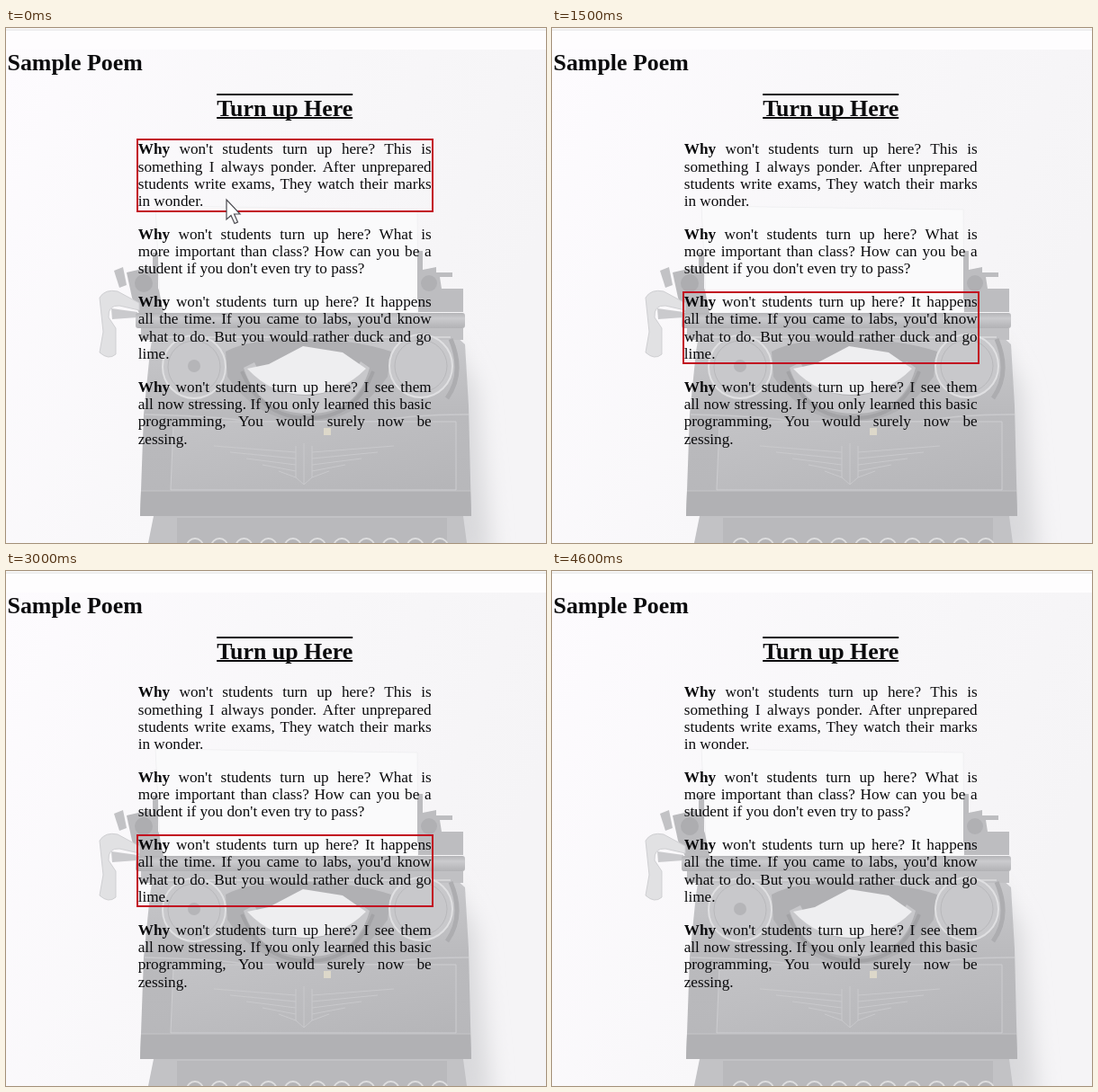
An HTML page for the animation above (4.7 s loop, 600 by 573 pixels).

```html
<!DOCTYPE html>
<html lang="en">
<head>
<meta charset="utf-8">
<title>Sample Poem</title>
<style>
html, body { margin: 0; width: 100%; height: 100%; overflow: hidden; background: #fff; }
#stage { position: relative; width: 600px; height: 573px; overflow: hidden;
  font-family: "Liberation Serif", "Times New Roman", serif; color: #0b0b0d; }
svg { position: absolute; left: 0; top: 0; }
h1, h2, p { position: absolute; margin: 0; }
h1, h2 { font-size: 25.9px; line-height: 30px; white-space: nowrap; }
h1 { left: 1.5px; top: 23.5px; }
h2 { left: 146.7px; width: 326px; top: 74.5px; text-align: center;
  text-decoration: underline overline 2px; text-decoration-skip-ink: none; }
p { left: 146.7px; width: 326px; font-size: 17.2px; line-height: 19.35px; }
.line { display: block; text-align: justify; text-align-last: justify; }
.line:last-child { text-align-last: left; }
.on { outline: 2px solid #c20a20; }
</style>
</head>
<body>
<div id="stage">
<svg width="600" height="573" viewBox="0 0 600 573">
  <defs>
    <linearGradient id="wall" x2="1" y2=".35">
      <stop offset="0" stop-color="#fdfbfe"/><stop offset=".55" stop-color="#f8f7f9"/><stop offset="1" stop-color="#f5f4f6"/>
    </linearGradient>
    <linearGradient id="shell" x2="0" y2="1">
      <stop offset="0" stop-color="#c9c9cc"/><stop offset=".45" stop-color="#bababd"/><stop offset="1" stop-color="#b7b7ba"/>
    </linearGradient>
    <linearGradient id="roller" x2="0" y2="1">
      <stop offset="0" stop-color="#b4b4b7"/><stop offset=".35" stop-color="#cbcbce"/><stop offset="1" stop-color="#b2b2b5"/>
    </linearGradient>
    <linearGradient id="panel" x2="1" y2="1">
      <stop offset="0" stop-color="#c3c3c6"/><stop offset="1" stop-color="#b5b5b8"/>
    </linearGradient>
    <filter id="soft" x="-50%" y="-20%" width="200%" height="140%"><feGaussianBlur stdDeviation="12"/></filter>
  </defs>
  <rect width="600" height="573" fill="#fefdfe"/>
  <rect width="600" height="1.5" fill="#f8f8f8"/>
  <rect y="1.5" width="600" height="1.5" fill="#ebebec"/>
  <rect y="24" width="600" height="549" fill="url(#wall)"/>
  <path d="M490 340L522 400L540 590H480Z" fill="#d9d9dc" filter="url(#soft)"/>

  <!-- carriage and paper -->
  <path d="M166 198L457 202L458 320H172Z" fill="#fafafb" stroke="#f0f0f2"/>
  <path d="M163 250h6v52h-6zM457 248h6v54h-6z" fill="#bcbcbf"/>
  <path d="M134 272L160 266L170 292L176 322H150L140 300Z" fill="#bbbbbe"/>
  <path d="M458 270L478 266V272H496V277H482L484 290H508V316H458Z" fill="#bdbdc0"/>
  <path d="M120 270l10-4 4 20-8 3z" fill="#c2c2c5"/>
  <circle cx="153" cy="284" r="10" fill="#adadb0"/>
  <circle cx="470" cy="284" r="9" fill="#b0b0b3"/>
  <path d="M104 300Q110 290 124 293L148 306V314L126 309Q113 308 114 322L122 334V363Q114 370 104 361L108 338Z" fill="#e1e1e3" stroke="#cfcfd2"/>
  <path d="M117 312L146 316V322L118 324Z" fill="#cacacd"/>

  <!-- body -->
  <path d="M164 336H492L510 352L514 420L517 543H149L153 430L160 360Z" fill="url(#shell)"/>
  <rect x="144" y="317" width="366" height="17" rx="3" fill="url(#roller)"/>
  <path d="M150 334H508V347H150Z" fill="#c0c0c3"/>
  <path d="M170 344H494" stroke="#d4d4d6" stroke-width="2"/>
  <path d="M244 360Q270 346 328 346T428 360L424 388Q390 438 335 438T246 388Z" fill="#b0b0b3"/>
  <path d="M264 378Q280 428 335 429T404 378L394 371Q374 409 333 409T276 372Z" fill="#c8c8cb"/>
  <path d="M268 379L292 374L330 354L374 361L400 379Q372 407 334 408T268 379Z" fill="#eeeef0"/>
  <path d="M262 382Q284 434 336 434T408 382" fill="none" stroke="#a3a3a6" stroke-width="4"/>
  <g fill="#c8c8cb" stroke="#e0e0e2" stroke-width="2">
    <circle cx="209" cy="377" r="35"/><circle cx="461" cy="376" r="35"/>
    <circle cx="209" cy="377" r="29" stroke="#b8b8bb" stroke-width="1"/>
    <circle cx="461" cy="376" r="29" stroke="#b8b8bb" stroke-width="1"/>
  </g>
  <circle cx="209" cy="376" r="7" fill="#b5b5b8"/>
  <path d="M494 346Q510 384 490 412" fill="none" stroke="#adadb0" stroke-width="5"/>
  <path d="M154 430Q240 432 270 438H410Q450 430 514 430" fill="none" stroke="#cacacd" stroke-width="1.5"/>
  <path d="M186 438H500V514H183Z" fill="url(#panel)" stroke="#cdcdd0"/>
  <rect x="353" y="445" width="8" height="8" fill="#ddd8ca"/>
  <g id="stripes" fill="none" stroke="#c9c9cc"></g>
  <path d="M150 515H516L517 543H149Z" fill="#b1b1b4"/>
  <path d="M150 515H516" stroke="#c5c5c8"/>
  <path d="M164 543H508L512 573H158Z" fill="#c2c2c5"/>
  <path d="M190 545H490V573H190Z" fill="#b9b9bc"/>
  <g id="keys" fill="#b4b4b7" stroke="#dededf" stroke-width="2"></g>
</svg>
<h1>Sample Poem</h1>
<h2>Turn up Here</h2>
<div id="poem"></div>
<svg width="600" height="573" viewBox="0 0 600 573">
  <path id="cursor" d="M0 0V22L5 17.5L9 26.5L12.5 25L8.5 16H15Z" fill="#fff" stroke="#4a4a50" stroke-width="1.2"/>
</svg>
</div>
<script>
const LOOP = 4700, STEP = 100, LINE = 19.35, GAP = 17.2, POEM_TOP = 125.2;
const verses = [
  "won't students turn up here? This is|something I always ponder. After unprepared|students write exams, They watch their marks|in wonder.",
  "won't students turn up here? What is|more important than class? How can you be a|student if you don't even try to pass?",
  "won't students turn up here? It happens|all the time. If you came to labs, you'd know|what to do. But you would rather duck and go|lime.",
  "won't students turn up here? I see them|all now stressing. If you only learned this basic|programming, You would surely now be|zessing."
];
// [start ms, highlighted verse], -1 for none
const hover = [
  [0, 0], [1200, 1], [1400, 2], [1700, 3], [1800, 2], [1900, 1], [2000, 0],
  [2400, 1], [2500, 2], [2700, 3], [3000, 2], [3200, 1], [3300, 0], [3700, -1]
];
// [ms, x, y]; the pointer is gone after the last entry
const path = [[0, 245, 191], [600, 267, 197], [700, 271, 198], [900, 281, 202], [1000, 282, 203], [1200, 282, 203]];

const byId = id => document.getElementById(id);
const cursor = byId("cursor");

function buildPoem() {
  let y = POEM_TOP;
  return verses.map(text => {
    const lines = text.split("|");
    const p = document.createElement("p");
    p.style.top = y + "px";
    p.innerHTML = lines.map((s, i) => `<span class="line">${i ? "" : "<b>Why</b> "}${s}</span>`).join("");
    byId("poem").append(p);
    y += lines.length * LINE + GAP;
    return p;
  });
}

function buildDetails() {
  let keys = "", stripes = "";
  for (let i = 0; i < 11; i++) keys += `<circle cx="${210 + i * 27.2}" cy="577" r="9"/>`;
  for (let i = 0; i < 5; i++) {
    const dx = 100 - i * 18, y = 465 + i * 7;
    stripes += `<path d="M${331 - dx} ${y}L322 ${y + 7}M${331 + dx} ${y}L340 ${y + 7}"/>`;
  }
  stripes += '<path d="M322 465V500L331 508L340 500V465M331 462V508"/>';
  byId("keys").innerHTML = keys;
  byId("stripes").innerHTML = stripes;
}

function cursorAt(t) {
  const i = path.findIndex(k => k[0] > t);
  if (i < 0) return null;
  const [t0, x0, y0] = path[i - 1], [t1, x1, y1] = path[i];
  const f = (t - t0) / (t1 - t0);
  return [x0 + (x1 - x0) * f, y0 + (y1 - y0) * f];
}

buildDetails();
const paragraphs = buildPoem();

function draw(now) {
  const t = Math.floor(now % LOOP / STEP) * STEP;
  const active = hover.filter(h => h[0] <= t).pop()[1];
  paragraphs.forEach((p, i) => p.classList.toggle("on", i === active));
  const pos = cursorAt(t);
  cursor.style.display = pos ? "" : "none";
  if (pos) cursor.setAttribute("transform", `translate(${pos})`);
}

const start = performance.now();
function tick() {
  draw(performance.now() - start);
  requestAnimationFrame(tick);
}
tick();
</script>
</body>
</html>
```
